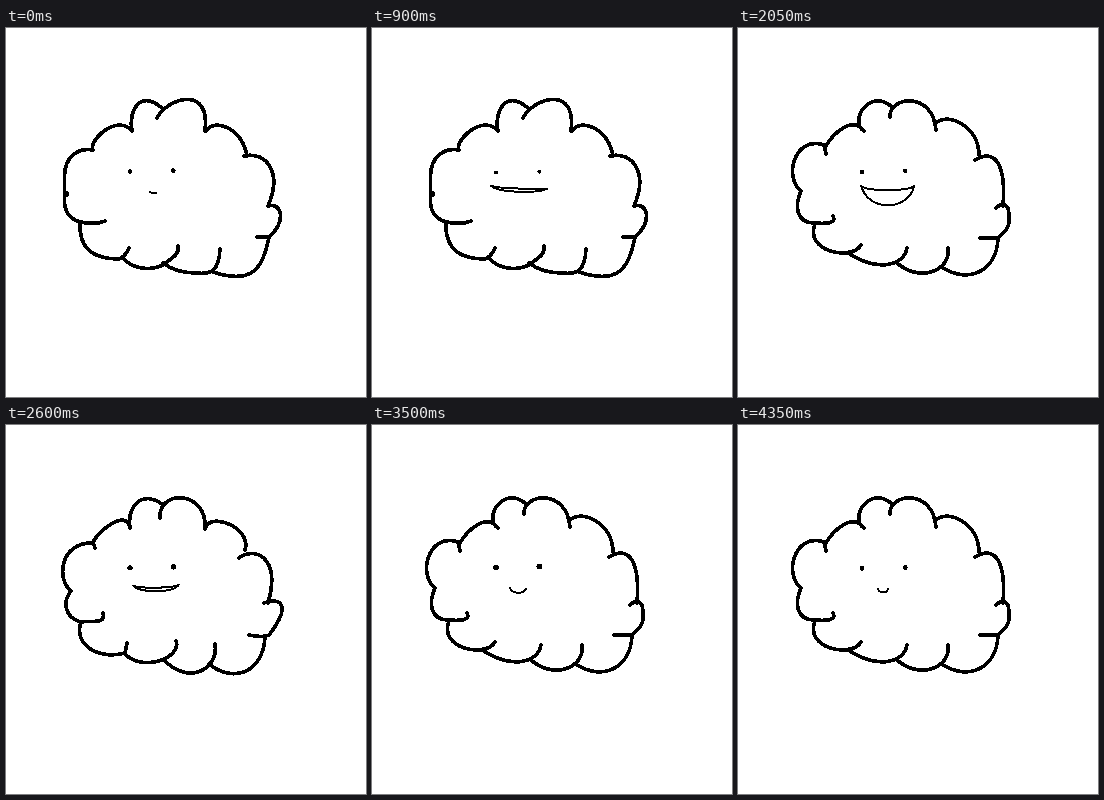
These frames come from a looping animation (360x369 px, 4.4 s). An HTML page:

```html
<!DOCTYPE html>
<html lang="en">
<head>
<meta charset="utf-8">
<title>Smiling cloud</title>
<style>
  html, body { margin: 0; width: 100%; height: 100%; overflow: hidden; background: #fff; }
  svg { display: block; width: 100%; height: 100%; shape-rendering: crispEdges; }
  path { fill: none; stroke: #000; stroke-linecap: round; stroke-linejoin: round; }
  .cloud { stroke-width: 3.7; }
  #mouth { stroke-width: 2; }
</style>
</head>
<body>
<svg viewBox="0 0 360 369">
  <!-- One curve per lobe, clockwise from the top left -->
  <path class="cloud" d="M126 103C122 83 134 61 156 80
    M151 90C161 70 205 56 199 103
    M200 103C209 89 237 101 241 128
    M238 128C262 123 276 146 262 178
    C277 174 280 195 263 209H251
    M263 209C257 241 246 257 207 244
    M214 221C213 242 206 247 190 245Q170 245 157 235
    M172 218C174 227 164 231 157 237C147 242 128 243 117 230
    M123 220Q119 229 113 231C90 231 73 223 74 195
    M99 193Q90 197 74 194Q58 189 58.5 172V147C59 131 70 119 87 122
    C82 113 111 85 126 103M61 165v2"/>
  <path class="cloud" d="M124 103C121 81 136 65 156 79
    M154 93C152 64 202 65 199 104
    C203 86 246 102 239 125
    M233 133C246 122 276 129 262 178
    M258 178C275 172 286 180 263 210Q257 213 243 210
    M259 212C257 249 226 258 203 239
    M209 219C213 244 183 261 158 235
    M170 216C176 232 138 248 119 229
    M121 218L119 228C94 235 67 221 75 197
    M97 188C100 200 86 195 75 197C59 193 56 177 65 166C50 154 54 117 87 118
    M89 123L87 117C94 104 121 84 124 103"/>
  <path class="cloud" d="M126 103C110 93 133 58 155 80
    M152 89C151 68 195 63 198 102
    M198 95C210 84 241 98 241 127
    M237 132C259 119 268 140 265 178
    M258 180Q265 173 270 180C274 199 268 203 260 210H242
    M260 210C259 243 231 256 205 240
    M210 220C213 244 180 255 158 234
    M169 220C166 237 141 245 110 225
    M123 217C114 233 66 224 77 196
    M95 188C100 198 79 195 75 195C59 194 56 179 63 163C45 149 57 107 86 117L88 126
    M87 119C97 103 115 88 126 103"/>
  <circle class="eye" cx="124"/>
  <circle class="eye" cx="167.3"/>
  <path id="mouth"/>
</svg>
<script>
const LOOP = 4400, STEP = 50, OUTLINE_TURNS = 18;
const clouds = document.querySelectorAll('.cloud');
const eyes = document.querySelectorAll('.eye');
const mouth = document.getElementById('mouth');

// Mouth keys: time, centre x, tilt, half width, depth of upper and lower lip
const rest = [147, 1, 3, 0.2, 0.2];
const keys = [
  [0, ...rest],
  [900, 147, 3, 28, 1.3, 4.5],
  [1400, 147, 1.5, 29, 1, 8.5],
  [2050, 149.8, 0, 26.5, 4, 19.3],
  [2600, 150.2, -1, 22.7, 2.5, 6],
  [3500, 146, 1, 8, 4.5, 4.5],
  [4350, 145, 0.5, 5, 3.5, 3.5],
  [LOOP, ...rest],
];

function mouthAt(t) {
  const i = keys.findIndex(key => key[0] > t);
  const from = keys[i - 1], to = keys[i];
  const k = (t - from[0]) / (to[0] - from[0]);
  return from.map((v, j) => v + (to[j] - v) * k).slice(1);
}

// The wider and deeper the smile, the higher its corners.
function mouthPath(x, tilt, half, upper, lower) {
  const y = 165.3 - half * 0.2 - lower * 0.1;
  const y0 = y - tilt / 2, y1 = y + tilt / 2;
  const a = x - half * 0.75, b = x + half * 0.75;
  const up = y + upper * 4 / 3, low = y + lower * 4 / 3;
  return `M${x - half} ${y0}C${a} ${up} ${b} ${up} ${x + half} ${y1}
    C${b} ${low} ${a} ${low} ${x - half} ${y0}`;
}

function draw() {
  const t = Math.floor(performance.now() % LOOP / STEP) * STEP;
  const active = Math.floor(t / LOOP * OUTLINE_TURNS) % clouds.length;
  clouds.forEach((cloud, i) => { cloud.style.display = i === active ? '' : 'none'; });

  const sway = Math.sin(t / LOOP * 2 * Math.PI);
  eyes.forEach((eye, i) => {
    eye.setAttribute('cy', 143.5 - i * 0.9 + sway * 1.2);
    eye.setAttribute('r', 2.4 - sway * 0.5);
  });
  mouth.setAttribute('d', mouthPath(...mouthAt(t)));
  requestAnimationFrame(draw);
}
draw();
</script>
</body>
</html>
```
